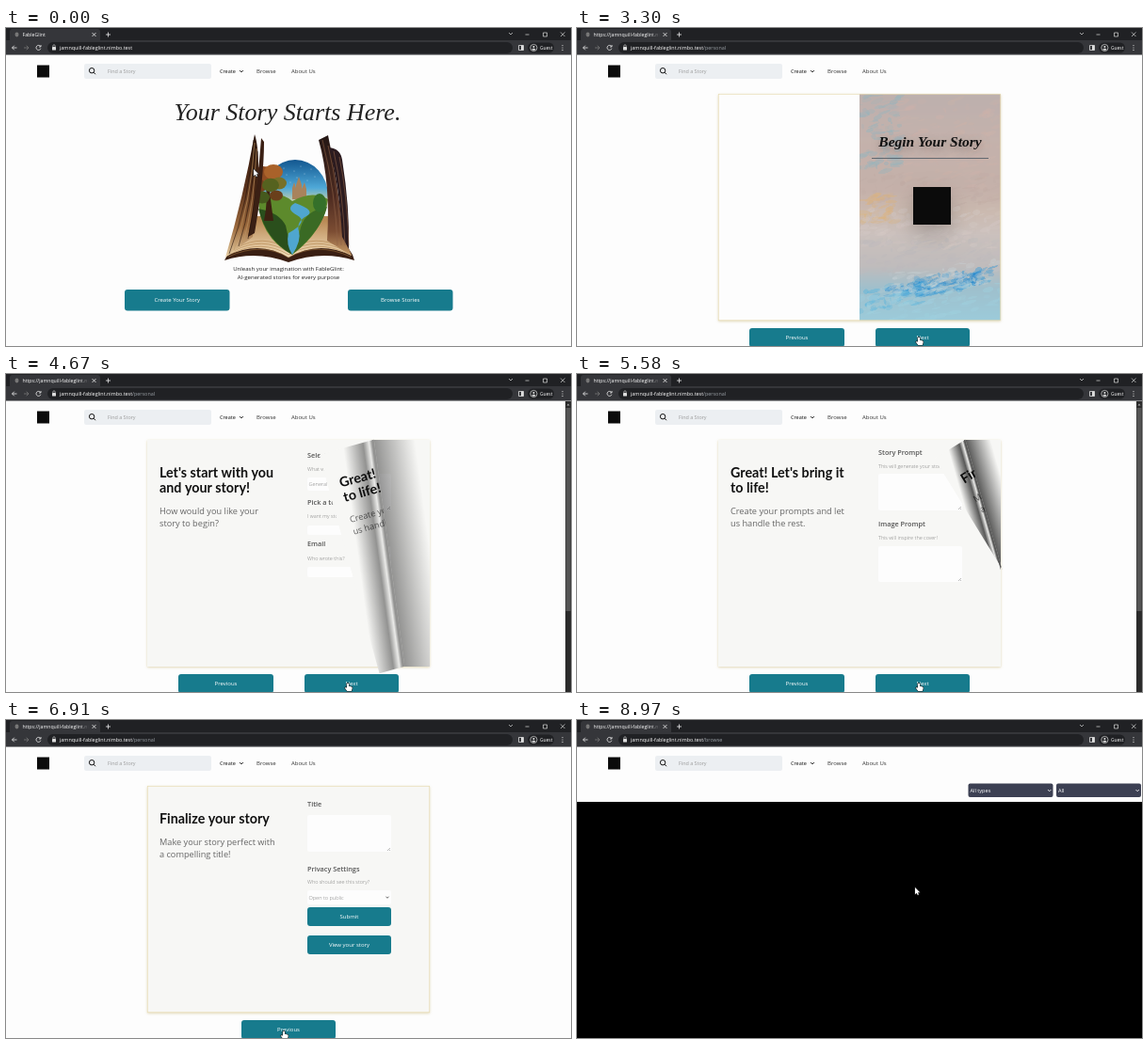
An HTML page with a canvas that plays this animation: 600x338 px, repeating every 9000 ms.

```html
<!DOCTYPE html>
<html lang="en">
<head>
<meta charset="utf-8">
<title>FableGlint</title>
<style>
html, body { margin: 0; width: 100%; height: 100%; overflow: hidden; background: #fdfdfd; }
canvas { display: block; width: 600px; height: 338px; }
</style>
</head>
<body>
<canvas id="stage"></canvas>
<script>
const LOOP = 9000, W = 150, H = 241, LEFT = 150, TOP = 70, SPINE = 300;
const FLIP = 700, TEAL = '#177b8d', PAPER = '#f7f7f5';
const HOST = 'jamnquill-fableglint.nimbo.test';
const SANS = '"Open Sans", sans-serif', HEAD = 'Lato, sans-serif', SCRIPT = '"Liberation Serif", serif';
const stage = document.getElementById('stage');
const ratio = Math.max(1, window.devicePixelRatio || 1);
stage.width = 600 * ratio;
stage.height = 338 * ratio;
let g = stage.getContext('2d');

const clamp = v => Math.min(1, Math.max(0, v));
const mix = (a, b, k) => a + (b - a) * k;

function sheet() {
  const c = document.createElement('canvas');
  c.width = W * 4;
  c.height = H * 4;
  c.getContext('2d').scale(4, 4);
  return c;
}
function drawOn(canvas, fn) {
  const old = g;
  g = canvas.getContext('2d');
  fn();
  g = old;
}
function scoped(fn) { g.save(); fn(); g.restore(); }
function box(x, y, w, h, fill, r = 0) {
  g.fillStyle = fill;
  g.beginPath();
  g.roundRect(x, y, w, h, r);
  g.fill();
}
function line(d, color, width = .8) {
  g.strokeStyle = color;
  g.lineWidth = width;
  g.stroke(new Path2D(d));
}
function shape(d, fill) { g.fillStyle = fill; g.fill(new Path2D(d)); }
function disc(x, y, rx, ry, fill, tilt = 0) {
  g.fillStyle = fill;
  g.beginPath();
  g.ellipse(x, y, rx, ry, tilt, 0, 7);
  g.fill();
}
function text(s, x, y, size, color, style = '400', family = SANS, align = 'left') {
  g.font = `${style} ${size}px ${family}`;
  g.textAlign = align;
  g.fillStyle = color;
  g.fillText(s, x, y);
}
function ramp(x0, y0, x1, y1, ...stops) {
  const r = g.createLinearGradient(x0, y0, x1, y1);
  stops.forEach(([at, color]) => r.addColorStop(at, color));
  return r;
}
function button(label, x, y, w, h) {
  box(x, y, w, h, TEAL, 3);
  text(label, x + w / 2, y + h / 2 + 2.2, 6, '#fff', '500', SANS, 'center');
}

// Painted cover: a vertical wash with seeded brush dabs, rising to the right near the bottom
const paint = sheet();
drawOn(paint, () => {
  let seed = 7;
  const rnd = () => (seed = seed * 16807 % 2147483647) / 2147483647;
  box(0, 0, W, H, ramp(0, 0, 0, H, [0, '#bdb0ae'], [.2, '#c4b2ac'], [.42, '#c5b1aa'], [.52, '#cbbab0'],
    [.62, '#cbc1bd'], [.76, '#c0bcbc'], [.86, '#9fc0cd'], [1, '#9ccbda']));
  const bands = [
    [0, 85, 0, 45, '#93b3bd', 90], [5, 100, 45, 150, '#ccb1a8', 130], [85, 118, 0, 150, '#bfaaa3', 70],
    [106, 138, 0, 38, '#dcb27a', 50], [122, 165, 0, 150, '#d3c8c4', 120], [155, 195, 0, 150, '#bcb9bc', 110],
    [208, 232, 0, 70, '#58b4dc', 60], [205, 224, 60, 145, '#2f97d6', 80], [208, 220, 30, 125, '#1d83cc', 50],
    [214, 250, 0, 150, '#9fd0df', 110], [196, 222, 20, 150, '#c9d2d6', 60]
  ];
  for (const [y0, y1, x0, x1, color, n] of bands) {
    for (let i = 0; i < n; i++) {
      const x = mix(x0, x1, rnd()), y = mix(y0, y1, rnd());
      g.globalAlpha = .12 + rnd() * .32;
      disc(x, y - (y > 190 ? x * .15 : 0), 1 + rnd() * 7, .6 + rnd() * 2.4, color, -.5 * rnd());
    }
  }
  g.globalAlpha = 1;
});

const leftPages = {
  2: [["Let's start with you", 'and your story!'], ['How would you like your', 'story to begin?']],
  4: [["Great! Let's bring it", 'to life!'], ['Create your prompts and let', 'us handle the rest.']],
  6: [['Finalize your story'], ['Make your story perfect with', 'a compelling title!']]
};
const label = (s, y) => text(s, 20, y, 7.3, '#555', '600');
const hint = (s, y) => text(s, 20, y, 5.5, '#777', '300');
function field(y, h, value, w = 89) {
  box(20, y, w, h, '#fdfdfd', 2);
  if (value) {
    text(value, 21.5, y + h / 2 + 2, 5.6, '#777', '300');
    line(`M${w + 14.5} ${y + h / 2 - .8}l1.5 1.6 1.5-1.6`, '#444');
  } else if (h > 20) {
    line(`M${w + 16} ${y + h - 1}l3-3M${w + 18} ${y + h - 1}l1-1`, '#777', .5);
  }
}
const rightPages = {
  3() {
    label('Select a type', 19);
    hint('What would you like?', 32.5);
    field(40, 14, 'General');
    label('Pick a tone', 69);
    hint('I want my story to be', 83);
    field(91, 10);
    label('Email', 113);
    hint('Who wrote this?', 127.5);
    field(135, 11);
  },
  5() {
    label('Story Prompt', 15.5);
    hint('This will generate your story.', 29.5);
    field(36, 39);
    label('Image Prompt', 92);
    hint('This will inspire the cover!', 106);
    field(113, 38);
  },
  7() {
    label('Title', 22);
    field(31, 39);
    label('Privacy Settings', 90.5);
    hint('Who should see this story?', 104.3);
    field(111, 15, 'Open to public');
    button('Submit', 20, 129, 89, 20);
    button('View your story', 20, 159, 89, 20);
  }
};
function cover(t) {
  g.globalAlpha = clamp((t - 2180) / 300);
  g.drawImage(paint, 0, 0, W, H);
  g.globalAlpha = 1;
  line('M13 68.5H137', '#4a5660', .8);
  scoped(() => {
    g.shadowColor = '#0004';
    g.shadowBlur = 8 * ratio;
    g.shadowOffsetY = 3 * ratio;
    text('Begin Your Story', 75, 56, 15.5, '#111', 'italic 700', SCRIPT, 'center');
    g.shadowColor = '#0003';
    g.shadowBlur = 22 * ratio;
    g.shadowOffsetY = 10 * ratio;
    box(57, 99, 40, 40, '#0b0b0b');
  });
}
function page(i, t) {
  box(0, 0, W, H, i < 2 ? '#fdfdfd' : PAPER);
  if (i === 1) cover(t);
  if (leftPages[i]) {
    const [head, sub] = leftPages[i];
    head.forEach((s, n) => text(s, 13, 39.5 + 16 * n, 14.3, '#111', '700', HEAD));
    sub.forEach((s, n) => text(s, 13, 46.5 + 16 * head.length + 13 * n, 9.2, '#666'));
  }
  if (rightPages[i]) rightPages[i]();
}
function place(i, t, x = i % 2 ? SPINE : LEFT) {
  scoped(() => {
    g.translate(x, TOP);
    g.beginPath();
    g.rect(0, 0, W, H);
    g.clip();
    page(i, t);
  });
}

// The free corner travels in a straight line; the fold is its perpendicular bisector
function softFlip(k, from, to, t) {
  const back = to < from;
  const top = 2 * from + (back ? 0 : 1), under = 2 * to + (back ? 0 : 1), flap = 2 * to + (back ? 1 : 0);
  place(2 * from + (back ? 1 : 0), t);
  place(under, t);
  const px = mix(426, 150, k), py = mix(94, 70, k);
  const angle = Math.atan2(TOP - py, 450 - px);
  const progress = (450 - px) / 300, size = 112 * progress;
  const dark = `rgba(0,0,0,${1.1 * (1 - progress) ** 2})`;
  const fold = fn => { g.translate((px + 450) / 2, (py + TOP) / 2); g.rotate(angle); fn(); };
  const unfold = () => { g.rotate(-angle); g.translate(-(px + 450) / 2, -(py + TOP) / 2); };
  const clipFlat = () => {
    g.beginPath();
    fold(() => g.rect(-900, -900, 900.5, 1800));
    g.clip();
    unfold();
  };
  const mirror = x => { g.translate(x, 0); g.scale(-1, 1); };
  scoped(() => {
    if (back) mirror(600);
    scoped(() => {
      clipFlat();
      if (back) mirror(600);
      place(top, t);
    });
    scoped(() => {
      g.beginPath();
      g.rect(SPINE, TOP, W, H);
      g.clip();
      fold(() => box(-1, -500, size + 1, 1000, ramp(0, 0, size, 0, [0, dark], [1, '#0000'])));
    });
    scoped(() => {
      clipFlat();
      g.translate(px, py);
      g.rotate(2 * angle);
      g.beginPath();
      g.rect(0, 0, W, H);
      g.clip();
      scoped(() => { if (back) mirror(W); page(flap, t); });
      g.rotate(-2 * angle);
      g.translate(-px, -py);
      const inner = size * .75;
      fold(() => box(-inner, -500, inner + 1, 1000, ramp(0, 0, -inner, 0,
        [.05, dark], [.15, 'rgba(0,0,0,.05)'], [.35, dark], [1, '#0000'])));
    });
  });
}

// The stiff cover swings round the spine in perspective
const swing = sheet();
function hardFlip(k, t) {
  place(0, t);
  place(3, t);
  const progress = mix(.08, 1, k), a = progress * Math.PI, front = a < Math.PI / 2;
  const shade = `rgba(0,0,0,${.6 * (1 - progress) * Math.sin(a)})`;
  box(SPINE, TOP, W, H, ramp(SPINE, 0, SPINE + W, 0, [.05, shade], [1, '#0000']));
  drawOn(swing, () => page(front ? 1 : 2, t));
  const depth = u => 781 / (781 - u * Math.sin(a));
  const at = u => SPINE + u * Math.cos(a) * depth(u);
  for (let u = 0; u < W; u++) {
    const x0 = Math.min(at(u), at(u + 1)), x1 = Math.max(at(u), at(u + 1)), h = H * depth(u + .5);
    g.drawImage(swing, (front ? u : W - 1 - u) * 4, 0, 4, H * 4, x0, TOP + H / 2 - h / 2, x1 - x0 + .4, h);
  }
}

const flips = [[3360, 0, 1], [4434, 1, 2], [5463, 2, 3], [7040, 3, 2]];
function story(t) {
  let spread = 0, active = null;
  for (const f of flips) {
    if (t >= f[0] + FLIP) spread = f[2];
    else if (t >= f[0]) active = f;
  }
  scoped(() => {
    g.shadowColor = '#c9b87c88';
    g.shadowBlur = 2.5 * ratio;
    g.shadowOffsetY = .6 * ratio;
    box(LEFT, TOP, 2 * W, H, '#fdfdfd');
  });
  const frame = () => {
    g.strokeStyle = '#e8dcb4';
    g.lineWidth = .7;
    g.strokeRect(LEFT + .3, TOP + .3, 2 * W - .6, H - .6);
  };
  if (spread === 3) button('Previous', 250, 319, 100, 20);
  else {
    button('Previous', 183, 319, 101, 20);
    button('Next', 317, 319, 100, 20);
  }
  if (!active) {
    place(2 * spread, t);
    place(2 * spread + 1, t);
    frame();
    return;
  }
  frame();
  const [start, from, to] = active, k = (t - start) / FLIP;
  if (from === 0) hardFlip(k, t);
  else {
    softFlip(k, from, to, t);
    box(594, 29, 6, 309, '#2b2b2b');
    box(594.5, 36, 5, 216, '#555');
    shape('M595.5 33.5l1.5-2 1.5 2z', '#aaa');
  }
}

function book() {
  shape('M232 247Q265 236 300 249Q335 236 370 247L368 241 345 205H255Z', '#3a1f13');
  shape('M235 242Q270 225 300 244Q332 225 367 242L343 200H260Z', ramp(0, 205, 0, 244, [0, '#b98a55'], [1, '#f3dfbd']));
  for (let i = 0; i < 4; i++) {
    line(`M${236 + i * 3} ${243 - i * 3}Q272 ${227 - i * 3} 300 ${244 - i * 3}Q330 ${227 - i * 3} ${366 - i * 3} ${243 - i * 3}`, '#a9793f', .5);
  }
  disc(307, 178, 35, 38, ramp(0, 140, 0, 200, [0, '#12568f'], [.5, '#4fa9d8'], [.8, '#e9d9a0'], [1, '#4b7a2a']));
  for (let i = 0; i < 14; i++) disc(283 + i * 37 % 48, 145 + i * 17 % 20, .4, .4, '#fff');
  shape('M304 182V170l2-6 2 6v-3l3-9 3 9v4l3-7 2 7v11z', '#a8835c');
  shape('M268 180Q290 172 304 184Q325 172 342 182Q338 215 304 241Q268 222 268 180Z', '#5d8a2c');
  shape('M304 241Q276 225 268 192Q290 196 297 210Z', '#2a4f1c');
  shape('M306 239Q335 215 341 190Q318 194 313 212Z', '#3a6a24');
  shape('M307 186Q296 192 309 199T300 218Q297 230 304 241Q314 226 311 216T319 200T307 186Z', '#4fa6cf');
  shape('M274 205Q279 180 275 162H279Q281 185 284 205Z', '#3d2212');
  [[273, 155, 10], [284, 153, 10], [290, 165, 8], [268, 168, 9], [281, 167, 9], [272, 180, 8], [287, 178, 7]]
    .forEach(([x, y, r], i) => disc(x, y, r, r * .8, ['#8f4c22', '#a9622a', '#77702a', '#74401c', '#55621f', '#45591d', '#6a3f1b'][i]));
  disc(333, 186, 7, 10, '#35702a');
  const left = ramp(0, 113, 0, 244, [0, '#2a160d'], [.45, '#5c331c'], [.75, '#9a683c'], [1, '#e8cfa4']);
  shape('M264 113Q268 124 268 150L262 222 233 244Q252 180 264 113Z', left);
  shape('M271 117L274 121Q274 160 264 218L257 222Q268 165 271 117Z', '#3b2014');
  for (let i = 0; i < 5; i++) line(`M${263 + i} ${119 + i * 3}Q${258 + i * 2} 185 ${237 + i * 5} ${240 - i * 4}`, i % 2 ? '#c29a66' : '#24130b', .6);
  shape('M332 119L342 114Q352 160 358 218L367 242 341 226Q345 165 332 119Z',
    ramp(0, 114, 0, 242, [0, '#241714'], [.5, '#4c2a20'], [.8, '#7c4d33'], [1, '#c99d68']));
  shape('M343 127Q355 128 357 140Q365 190 364 235L357 222Q354 165 343 127Z', '#2b1b1f');
  for (let i = 0; i < 4; i++) line(`M${336 + i * 6} ${119 + i * 6}Q${350 + i * 4} 175 ${352 + i * 4} 231`, '#8f6247', .6);
}
function home() {
  text('Your Story Starts Here.', 299, 98, 26, '#222', 'italic 400', SCRIPT, 'center');
  book();
  text('Unleash your imagination with FableGlint:', 300, 257.5, 6.05, '#222', '400', SANS, 'center');
  text('AI-generated stories for every purpose', 300, 267.3, 6.05, '#222', '400', SANS, 'center');
  button('Create Your Story', 126, 278, 111.5, 22.5);
  button('Browse Stories', 363, 278, 111.5, 22.5);
}
function browse() {
  box(0, 87, 600, 251, '#000');
  [['All types', 415.5], ['All', 509]].forEach(([s, x]) => {
    box(x, 67.5, 90, 14.5, '#3c4053', 2);
    text(s, x + 2, 76.8, 5.6, '#fff', '500');
    line(`M${x + 84.5} 74l1.7 1.8 1.7-1.8`, '#fff');
  });
}

function chrome(title, path) {
  box(0, 0, 600, 14, '#202124');
  box(4, 1, 96, 14, '#35363a', 3);
  box(0, 13, 600, 15, '#35363a');
  box(0, 28, 600, 1, '#909193');
  disc(11.5, 7, 2, 2.4, '#777');
  scoped(() => {
    g.beginPath();
    g.rect(17, 0, 71, 14);
    g.clip();
    text(title, 17.5, 9, 5.2, ramp(78, 0, 88, 0, [0, '#fff'], [1, '#fff0']), '500');
  });
  line('M91.5 5l4 4m0-4l-4 4M108.5 4.5v5m-2.5-2.5h5', '#eee');
  line('M534 5l2 2 2-2M551.5 7h4M570.5 5h4v4h-4zM589 4.5l4.5 4.5m0-4.5l-4.5 4.5', '#ddd', .7);
  line('M11.5 21H6.5m2.3-2.3L6.5 21l2.3 2.3M36.6 19.5a2.5 2.5 0 1 0 .3 2.2M37 18v2h-2', '#eee');
  line('M19 21h5m-2.3-2.3L24 21l-2.3 2.3', '#777');
  box(44, 15, 494, 12, '#202124', 6);
  box(49, 20, 4, 3.4, '#ddd', .5);
  line('M49.8 20v-1a1.2 1.2 0 0 1 2.4 0v1', '#ddd', .6);
  text(HOST, 57, 23, 5.4, '#fff', '500');
  text(path, 57 + g.measureText(HOST).width, 23, 5.4, '#9aa0a6');
  line('M544.5 18.5h5v5h-5z', '#ddd');
  box(547, 18.5, 2.5, 5, '#ddd');
  box(554, 15.5, 28, 11, '#202124', 5.5);
  line('M564 21a3.6 3.6 0 1 1-7.2 0a3.6 3.6 0 1 1 7.2 0', '#ddd', .7);
  disc(560.4, 20, 1.1, 1.1, '#ddd');
  disc(560.4, 22.7, 1.9, 1, '#ddd');
  text('Guest', 567, 23, 4.9, '#fff', '500');
  [18.6, 21, 23.4].forEach(y => disc(591, y, .6, .6, '#ddd'));
}
function header() {
  box(33, 39.5, 13, 13, '#0b0b0b');
  box(83, 38, 135, 16, '#eceff2', 2);
  line('M93.8 45.2a2.7 2.7 0 1 1-5.4 0a2.7 2.7 0 1 1 5.4 0M93 47.2l2 2', '#111', 1);
  text('Find a Story', 108, 48, 5.4, '#999');
  text('Create', 227, 48, 5.5, '#111', '500');
  line('M248 45l2 2 2-2', '#111');
  text('Browse', 266, 48.2, 6, '#333');
  text('About Us', 303, 48.2, 6, '#333');
}

const track = [
  [0, 263, 150], [180, 255, 166], [330, 255, 166], [700, 236, 232], [1090, 181, 294], [1240, 181, 294],
  [1500, 585, 326], [1750, 585, 326], [2180, 517, 312], [2700, 430, 262], [3060, 378, 312],
  [3280, 363, 329], [6420, 363, 329], [6880, 295, 331], [7780, 295, 331], [8210, 274, 43],
  [8390, 279, 45], [8640, 279, 45], [8940, 359, 178], [LOOP, 359, 178]
];
const pointing = [[1050, 1240], [3200, 6450], [6750, 7840], [8170, 8640]];
const arrow = new Path2D('M0 0V7.2L1.7 5.7 2.8 8.1 3.9 7.6 2.9 5.2H5.1Z');
const hand = new Path2D('M-1 .3Q0-1 1 .3V2.8L4 3.5Q4.9 4 4.6 5.2L3.8 8H-.6L-3 5Q-3.2 3.6-1 4.6Z');
function cursor(t) {
  const n = track.findIndex(p => p[0] > t), [t0, x0, y0] = track[n - 1], [t1, x1, y1] = track[n];
  const k = (t - t0) / (t1 - t0), e = k * k * (3 - 2 * k);
  const icon = pointing.some(([a, b]) => t >= a && t < b) ? hand : arrow;
  scoped(() => {
    g.translate(mix(x0, x1, e), mix(y0, y1, e));
    g.lineJoin = 'round';
    g.lineWidth = 1.2;
    g.strokeStyle = '#222';
    g.stroke(icon);
    g.fillStyle = '#fff';
    g.fill(icon);
  });
}

function draw() {
  const t = performance.now() % LOOP;
  g.setTransform(ratio, 0, 0, ratio, 0, 0);
  box(0, 0, 600, 338, '#fdfdfd');
  const view = t < 1240 ? 'home' : t < 8640 ? 'personal' : 'browse';
  header();
  ({ home, personal: story, browse })[view](t);
  chrome(view === 'home' ? 'FableGlint' : 'https://' + HOST, view === 'home' ? '' : '/' + view);
  cursor(t);
  requestAnimationFrame(draw);
}
draw();
</script>
</body>
</html>
```
